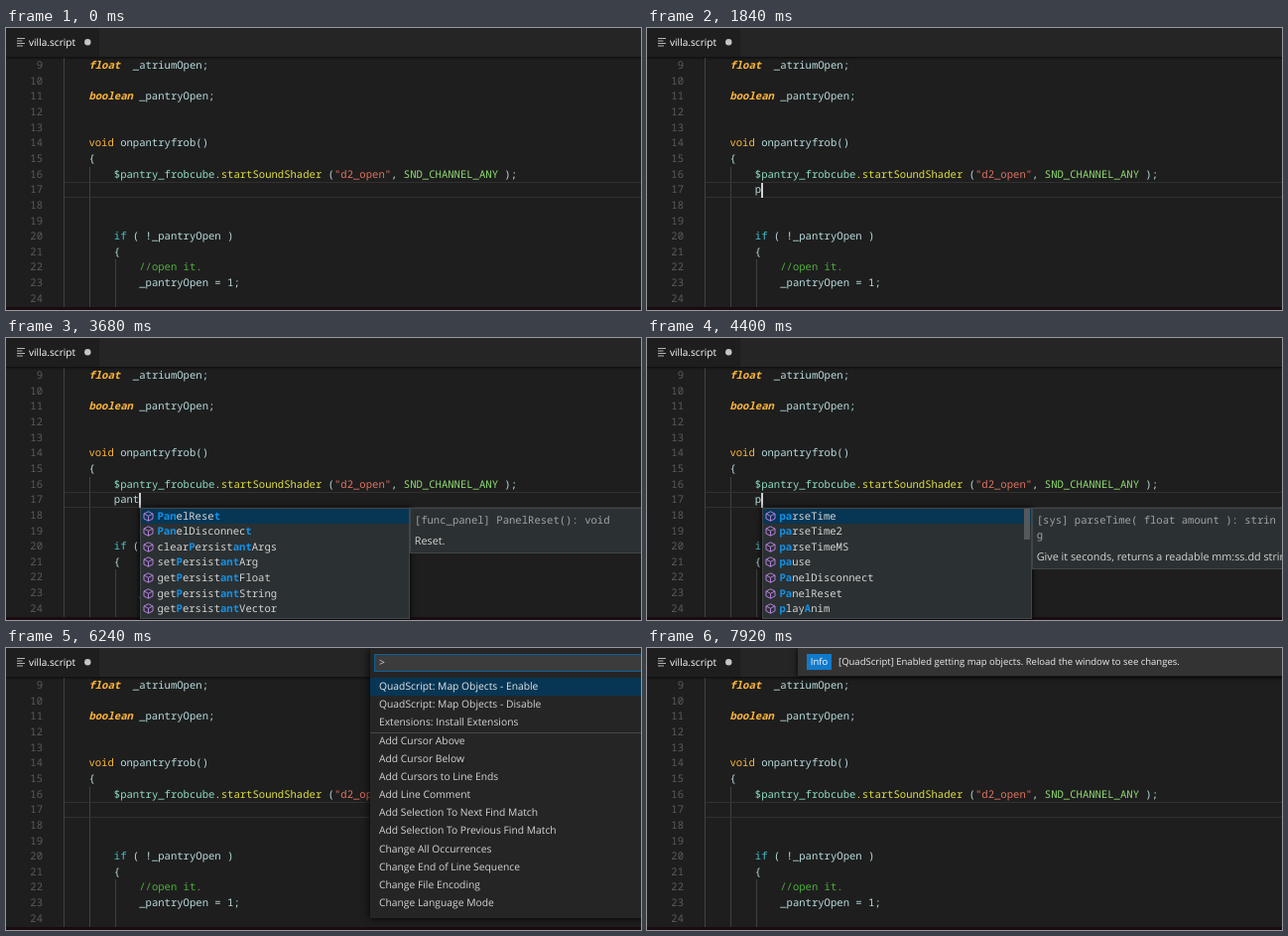
An HTML page for the animation above (8000 ms loop, 640 px wide and 284 px high).

```html
<!DOCTYPE html>
<html lang="en">
<head>
<meta charset="utf-8">
<title>Editor suggestions</title>
<style>
html, body { margin: 0; width: 100%; height: 100%; overflow: hidden; background: #1e1e1e; }
#stage { position: relative; width: 640px; height: 284px; overflow: hidden; background: #1e1e1e;
  color: #d4d4d4; font: 10.3px "Open Sans", "Noto Sans", sans-serif; text-rendering: geometricPrecision; }
#stage div, #stage svg { position: absolute; box-sizing: border-box; white-space: pre; }
#stage .mono { font: 500 10.58px/15.63px "Noto Sans Mono", "DejaVu Sans Mono", monospace; }
.num { color: #5a5a5a; width: 37px; left: 0; text-align: right; }
.guide { width: 1px; background: #404040; }
i, u { color: #ffb638; text-decoration: none; }
i { font-weight: 600; }
.v { color: #b8dbdd; } .o { color: #8fdcc2; } .f { color: #dede45; } .s { color: #df7160; }
.c { color: #8edb70; } .m { color: #4fae3c; } .k { color: #43c2d0; }
.box { background: #2b3032; border: 1px solid #414648; }
#popup { top: 170.5px; width: 272px; height: 112px; box-shadow: 0 0 6px #000; }
#items { left: 0; top: 0; width: 100%; }
#popup .row { left: 0; width: 100%; height: 15.63px; padding: 1px 0 0 16.7px; }
#popup .row:first-child { background: #073655; }
#popup svg { left: 2px; top: 2px; }
#popup b { color: #1292e8; }
#thumb { right: 1px; top: 0; width: 6px; height: 31px; background: #56595b; }
#detail { left: 271px; top: -1px; width: 300px; }
#sig { left: 4px; top: 5px; color: #a0a3a4; }
#doc { left: 4px; font: 10.8px/16px "Open Sans", "Noto Sans", sans-serif; color: #d4d4d4; }
#palette { left: 367px; top: 0; width: 300px; height: 272px; background: #252526; box-shadow: 0 0 8px #000; }
#commands { left: 0; top: 30px; width: 100%; }
#palette .row { left: 0; width: 100%; height: 18.17px; padding-left: 9px; line-height: 18.17px; }
#palette .row:first-child { background: #073655; color: #e6e6e6; }
#input { left: 4px; top: 6px; width: 290px; height: 18px; padding-left: 4px; line-height: 16px;
  background: #3c3c3c; border: 1px solid #0e6198; }
#toast { left: 152px; width: 500px; height: 28px; font-size: 9.5px; line-height: 28px;
  background: #333; box-shadow: 0 0 6px #000; color: #ececec; }
#info { left: 9px; top: 6px; width: 25px; height: 16px; line-height: 16px; text-align: center; background: #117acb; color: #fff; }
</style>
</head>
<body>
<div id="stage">
  <div style="left:0;top:0;width:640px;height:29px;background:#252526"></div>
  <div style="left:0;top:0;width:94px;height:29px;background:#1e1e1e"></div>
  <div style="left:0;top:29px;width:640px;height:3px;background:linear-gradient(#0008,#0000)"></div>
  <svg width="100" height="28" stroke="#c5c5c5" fill="#c5c5c5" style="left:0;top:0">
    <path d="M11 10.5h8M11 13h5.5M11 15.5h8M11 18h6" stroke-width=".9"/>
    <circle cx="82.3" cy="14.3" r="3.2" stroke="none"/>
  </svg>
  <div style="left:23px;top:7px;line-height:14px;font-size:10.1px;font-weight:500;color:#fff">villa.script</div>
  <div id="code"></div>
  <div id="typed" class="mono v"></div>
  <div id="caret" style="top:155.5px;width:1.4px;height:15px;background:#d0d0d0"></div>
  <div style="left:0;top:281px;width:640px;height:3px;background:#1b0c11"></div>
  <div id="popup" class="box mono"><div id="items"></div><div id="thumb"></div><div id="detail" class="box"><div id="sig"></div><div id="doc"></div></div></div>
  <div id="palette">
    <div id="input">&gt;<div id="inputCaret" style="left:10px;top:2px;width:1px;height:12px;background:#e0e0e0"></div></div>
    <div id="commands"></div>
    <div style="left:0;top:84.5px;width:100%;height:1px;background:#45454a"></div>
  </div>
  <div id="toast"><div id="info">Info</div><div style="left:41px;top:0">[QuadScript] Enabled getting map objects. Reload the window to see changes.</div></div>
</div>
<script>
const $ = id => document.getElementById(id);
const CHAR = 6.35, LINE = 15.63, LOOP = 8000, LEFT = 58, WORD_X = LEFT + 8 * CHAR;
const lineY = n => 31.2 + (n - 9) * LINE;

// line number: [indent, markup]
const code = {
  9: [1, '<i>float</i>  _atriumOpen;'],
  11: [1, '<i>boolean</i> _pantryOpen;'],
  14: [1, '<u>void</u> onpantryfrob()'],
  15: [1, '{'],
  16: [2, '<span class="o">$pantry_frobcube</span><span class="f">.startSoundShader</span> (<span class="s">"d2_open"</span>, <span class="c">SND_CHANNEL_ANY</span> );'],
  20: [2, '<span class="k">if</span> ( !_pantryOpen )'],
  21: [2, '{'],
  22: [3, '<span class="m">//open it.</span>'],
  23: [3, '_pantryOpen = 1;']
};

let html = '';
for (const [x, n] of [[58, 9], [84, 16], [110, 22]])
  html += `<div class="guide" style="left:${x}px;top:${lineY(n) - 1}px;height:${282 - lineY(n)}px"></div>`;
for (const y of [155, 170])
  html += `<div style="left:59px;top:${y}px;width:581px;height:1px;background:#303030"></div>`;
for (let n = 9; n <= 24; n++) {
  html += `<div class="mono num" style="top:${lineY(n)}px">${n}</div>`;
  if (code[n]) html += `<div class="mono v" style="left:${LEFT + code[n][0] * 4 * CHAR}px;top:${lineY(n)}px">${code[n][1]}</div>`;
}
$('code').innerHTML = html;
$('typed').style.cssText = `left:${WORD_X}px;top:${lineY(17)}px`;

// square brackets mark the matched letters
const lists = {
  pa: {
    items: '[pa]rseTime [pa]rseTime2 [pa]rseTimeMS [pa]use [Pa]nelDisconnect [Pa]nelReset [p]lay[A]nim',
    sig: '[sys] parseTime( float amount ): strin\ng', lines: 2,
    doc: 'Give it seconds, returns a readable mm:ss.dd string'
  },
  pant: {
    items: '[Pan]elRese[t] [Pan]elDisconnec[t] clear[P]ersist[ant]Args set[P]ersist[ant]Arg get[P]ersist[ant]Float get[P]ersist[ant]String get[P]ersist[ant]Vector',
    sig: '[func_panel] PanelReset(): void', lines: 1, doc: 'Reset.'
  }
};
const cube = '<svg width="11" height="11" fill="none" stroke="#b180d7"><path d="M5.5 .8L10 3v5L5.5 10.2L1 8V3zM1 3l4.5 2.3L10 3M5.5 5.3v4.9"/></svg>';

const rows = (list, pitch, icon = '') => list.map((s, i) =>
  `<div class="row" style="top:${i * pitch}px">${icon}${s}</div>`).join('');

$('commands').innerHTML = rows([
  'QuadScript: Map Objects - Enable', 'QuadScript: Map Objects - Disable', 'Extensions: Install Extensions',
  'Add Cursor Above', 'Add Cursor Below', 'Add Cursors to Line Ends', 'Add Line Comment',
  'Add Selection To Next Find Match', 'Add Selection To Previous Find Match', 'Change All Occurrences',
  'Change End of Line Sequence', 'Change File Encoding', 'Change Language Mode'
], 18.17);

const show = (id, on) => $(id).style.display = on ? '' : 'none';
const between = (t, a, b) => t >= a && t < b;

let shown;
function fillPopup(key) {
  if (key === shown) return;
  shown = key;
  const l = lists[key], h = l.lines * LINE;
  $('items').innerHTML = rows(l.items.replace(/\[/g, '<b>').replace(/\]/g, '</b>').split(' '), LINE, cube);
  $('sig').textContent = l.sig;
  $('doc').textContent = l.doc;
  $('doc').style.top = h + 10 + 'px';
  $('detail').style.height = h + 31 + 'px';
  show('thumb', key === 'pa');
}

// [time, typed text]
const typing = [[0, ''], [1840, 'p'], [2080, 'pa'], [2240, 'pan'], [2480, 'pant'],
  [3920, 'pan'], [4160, 'pa'], [4400, 'p'], [4480, '']];

function draw(t) {
  const text = typing.filter(k => k[0] <= t).pop()[1];
  const x = WORD_X + text.length * CHAR;
  const palette = between(t, 4960, 7440);
  $('typed').textContent = text;
  $('caret').style.left = x + 'px';
  show('caret', text || !palette && (t < 1840 ? between(t % 1000, 480, 960) : between(t, 4480, 4960)));

  const popup = between(t, 1920, 4480);
  show('popup', popup);
  if (popup) {
    fillPopup(text.length > 2 ? 'pant' : 'pa');
    $('popup').style.left = x + .6 + 'px';
  }

  show('palette', palette);
  show('inputCaret', between(t, 5430, 5990) || between(t, 6550, 7110));

  const slide = Math.min(1, Math.max(0, (t - 7520) / 200));
  show('toast', slide > 0);
  $('toast').style.top = -28 * (1 - slide) ** 2 + 'px';
}

function tick() {
  draw(performance.now() % LOOP);
  requestAnimationFrame(tick);
}
tick();
</script>
</body>
</html>
```
